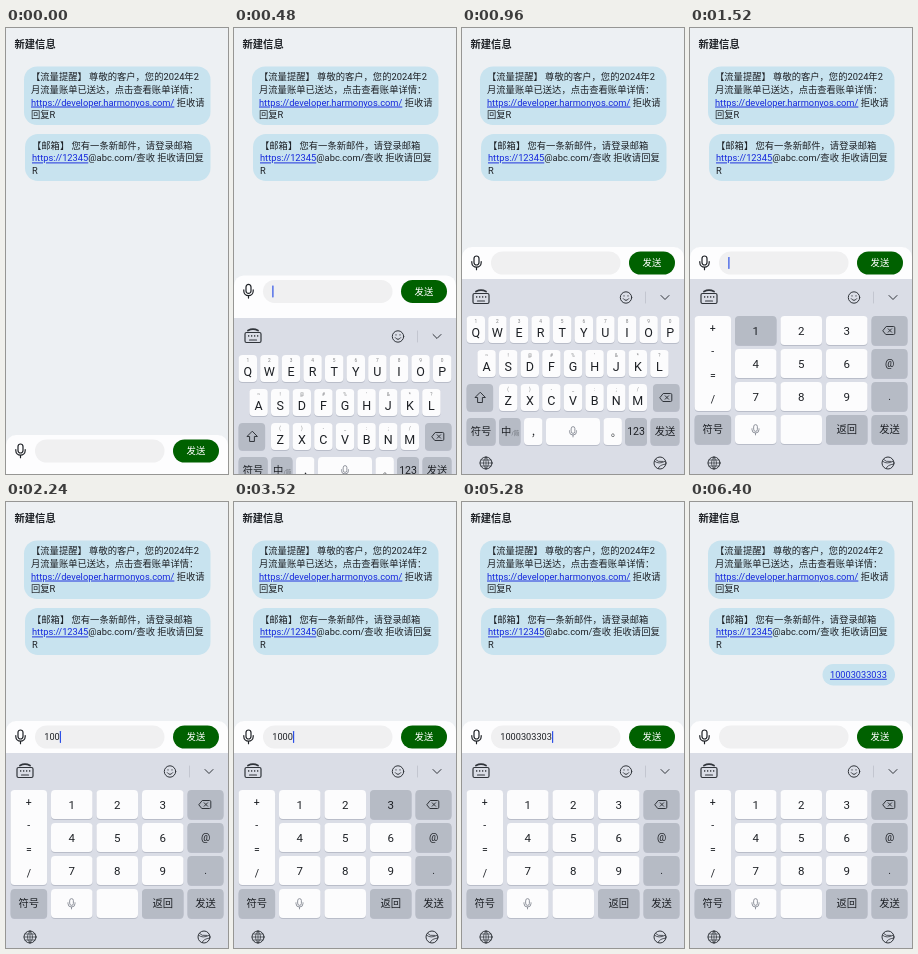
Recreate the animation shown at these times as an HTML page. Size 222 by 446 pixels, loop 6480 ms.

```html
<!DOCTYPE html>
<html lang="zh-CN">
<head>
<meta charset="utf-8">
<style>
  html, body { margin: 0; width: 100%; height: 100%; overflow: hidden; background: #edf0f3; }
  svg { display: block; width: 222px; height: 446px; }
  text { font-family: Roboto, "Noto Sans CJK SC", "Noto Sans CJK", sans-serif; white-space: pre; }
  .link { fill: #1528dc; text-decoration: underline; }
  .line { fill: none; stroke: #30343a; stroke-linecap: round; stroke-linejoin: round; }
</style>
</head>
<body>
<svg id="stage" viewBox="0 0 222 446"></svg>
<script>
const LOOP = 6480, STEP = 80;
const NUMBER = "10003033033";
const PRESSES = [1520, 1760, 2080, 3120, 3520, 3920, 4160, 4720, 4960, 5200, 5440];
const RELEASES = [1600, 1840, 2160, 3280, 3600, 4000, 4240, 4800, 5040, 5280, 5600];
const CURSOR_OFF = [[0, 240], [880, 1360], [2640, 3120], [4480, 4720], [6400, LOOP]];
const SLIDE_START = 160, SLIDE_TIME = 560;
const PAD_SHOWN = 1280, SENT = 6000;
const WHITE = "#fcfcfd", GREY = "#b6bbc5", INK = "#1d2025";

const rect = (x, y, w, h, r, fill, extra = "") =>
  `<rect x="${x}" y="${y}" width="${w}" height="${h}" rx="${r}" fill="${fill}" ${extra}/>`;

// y is the vertical middle of the glyphs
const text = (x, y, size, body, extra = "") =>
  `<text x="${x}" y="${y + size * 0.36}" font-size="${size}" fill="${INK}" ${extra}>${body}</text>`;
const label = (x, y, size, body, extra = "") => text(x, y, size, body, `text-anchor="middle" ${extra}`);
const line = (d, width = 1, extra = "") => `<path class="line" d="${d}" stroke-width="${width}" ${extra}/>`;
const at = (x, y, body) => `<g transform="translate(${x} ${y})">${body}</g>`;
const link = s => `<tspan class="link">${s}</tspan>`;

const key = (x, y, w, h, fill, body = "", size = 11, extra = "") =>
  rect(x, y + 1, w, h, 4, "#b9bdc9") + rect(x, y, w, h, 4, fill, extra) +
  (body ? label(x + w / 2, y + h / 2, size, body) : "");

const mic = (x, y, scale, color) => `<g transform="translate(${x} ${y}) scale(${scale})">` +
  line("M-2.5 -4a2.5 2.5 0 0 1 5 0v4a2.5 2.5 0 0 1 -5 0z M-4.7 -1v1a4.7 4.7 0 0 0 9.4 0v-1 M0 4.8v2.4",
    1.2, `style="stroke:${color}"`) + "</g>";

const backspace = (x, y) => at(x, y,
  line("M-6 0l3.2 -4h7.4q1.2 0 1.2 1.2v5.6q0 1.2 -1.2 1.2h-7.4z M-.8 -1.7l3.4 3.4m0 -3.4l-3.4 3.4"));

function bubble(x, y, w, h, textX, firstY, lines) {
  return rect(x, y, w, h, 13, "#c8e3ef") +
    lines.map((s, i) => text(textX, firstY + i * 12.6, 9.3, s)).join("");
}

function messages() {
  return text(8.5, 16.5, 10.3, "新建信息", 'font-weight="700"') +
    bubble(18, 38.5, 186.5, 58.5, 25, 49, [
      "【流量提醒】 尊敬的客户，您的2024年2",
      "月流量账单已送达，点击查看账单详情：",
      link("https://developer.harmonyos.com/") + " 拒收请",
      "回复R"]) +
    bubble(19, 106, 185.5, 47, 26, 117.5, [
      "【邮箱】 您有一条新邮件，请登录邮箱",
      link("https://12345") + "@abc.com/查收 拒收请回复",
      "R"]) +
    `<g id="reply">${rect(132.5, 162, 72.5, 21.5, 10.7, "#c8e3ef")}${text(140, 172.5, 9.2, link(NUMBER))}</g>`;
}

// drawn around y = 0
function inputBar() {
  return rect(0, -16, 222, 240, 10, "#fdfdfe") + mic(14.5, -0.5, 1, INK) +
    rect(29, -11.5, 129.5, 23, 11.5, "#f0f0f1") +
    rect(167, -11.5, 46, 23, 11.5, "#006100") +
    label(190, 0, 9.4, "发送", 'style="fill:#fff" font-weight="500"') +
    text(38.3, 0, 9.2, "", 'id="typed"') +
    rect(38, -6, 1.2, 12, 0.4, "#2d50e6", 'id="cursor"');
}

function toolbar() {
  const dots = [14, 17, 20, 23].map(x => rect(x, 268.3, 1.3, 1.3, 0, INK)).join("");
  return rect(0, 251, 222, 200, 0, "#dadde6") +
    line("M12.5 265.5h13q1.5 0 1.5 1.5v7q0 1.5 -1.5 1.5h-13q-1.5 0 -1.5 -1.5v-7q0 -1.5 1.5 -1.5z M15.5 273h7", 1.2) +
    line("M14 263.5q5 -2.6 10 0", 1.8) + dots +
    at(164, 269.5, '<circle class="line" r="5.7"/>' + line("M-2.7 1.2q2.7 3.6 5.4 0 M-2 -1.8v.4 M2 -1.8v.4")) +
    line("M183.5 264v11", 0.6, 'style="stroke:#b4b8c2"') + line("M199 267.5l4 4 4 -4") +
    at(24, 435, '<circle class="line" r="6"/>' +
      line("M-6 0h12 M0 -6v12 M0 -6q-5.5 6 0 12 M0 -6q5.5 6 0 12 M-5 -3h10 M-5 3h10", 0.7)) +
    at(198, 435, '<circle class="line" r="6"/>' +
      line("M-5.6 -2q4 4 11 .2 M-4.5 -3.5q2 2.8 7.5 2 M-2 5.6q1.5 -4 7.8 -4.5", 0.8));
}

function letterKeys() {
  const pitch = 21.6, width = 18.4;
  const row = (letters, hints, x0, y) => [...letters].map((c, i) => {
    const x = x0 + i * pitch, mid = x + width / 2;
    return key(x, y, width, 27, WHITE) +
      label(mid, y + 5.5, 4.8, hints[i].replace("&", "&amp;"), 'opacity=".55"') + label(mid, y + 16.5, 12.5, c);
  }).join("");
  return row("QWERTYUIOP", "1234567890", 4.6, 288) +
    row("ASDFGHJKL", "~!@#%'&*?", 15.4, 322) +
    row("ZXCVBNM", "()-_:;/", 37, 356) +
    key(4.6, 356, 26.5, 27, GREY) + line("M18 364.5l-5 5h2.6v5h4.8v-5h2.6z") +
    key(191, 356, 26.5, 27, GREY) + backspace(204, 369.5) +
    key(4.6, 390, 29, 27, GREY, "符号", 10.3) +
    key(37, 390, 21.5, 27, GREY) + text(39, 403.5, 10.3, "中") +
    text(49.5, 405, 5.5, "/简", 'opacity=".5"') +
    key(62, 390, 18.4, 27, WHITE) + label(74, 404, 10, "，") +
    key(84, 390, 54, 27, WHITE) + mic(111, 403.5, 0.75, "#858a94") +
    key(141.5, 390, 18.4, 27, WHITE) + label(154, 404, 10, "。") +
    key(163, 390, 22, 27, GREY, "123", 10.5) +
    key(188.5, 390, 29, 27, GREY, "发送", 10.3);
}

function numberKeys() {
  const columns = [45, 90.5, 136], rows = [288, 321, 354, 387], w = 41.5, h = 29;
  const digit = (n, x, y) => key(x, y, w, h, WHITE, n, 11.5, `id="digit${n}"`);
  let out = key(4.6, 288, 36.5, 95, WHITE);
  ["+", "-", "=", "/"].forEach((s, i) => out += label(22.8, 300 + i * 23.7, 10.5, s));
  for (let n = 1; n <= 9; n++) out += digit(n, columns[(n - 1) % 3], rows[Math.floor((n - 1) / 3)]);
  ["", "@", ".", "发送"].forEach((s, i) => out += key(181.5, rows[i], 36, h, GREY, s, 10.3));
  return out + backspace(199, 302.5) +
    key(4.6, 387, 36.5, h, GREY, "符号", 10.3) +
    key(45, 387, w, h, WHITE) + mic(65.5, 401.5, 0.75, "#858a94") +
    digit(0, 90.5, 387) + key(136, 387, w, h, GREY, "返回", 10.3);
}

const stage = document.getElementById("stage");
stage.innerHTML = rect(0, 0, 222, 446, 0, "#edf0f3") + messages() +
  `<g id="bar">${inputBar()}</g>` +
  `<g id="keyboard">${toolbar()}<g id="letters">${letterKeys()}</g><g id="pad">${numberKeys()}</g></g>`;

const el = id => document.getElementById(id);
const show = (id, on) => el(id).setAttribute("visibility", on ? "visible" : "hidden");
const moveY = (id, y) => el(id).setAttribute("transform", `translate(0 ${y})`);

function draw(t) {
  const left = 1 - Math.min(1, Math.max(0, (t - SLIDE_START) / SLIDE_TIME));
  moveY("bar", 235 + 188 * left ** 2.23);
  moveY("keyboard", 195 * left ** 1.9);
  show("letters", t < PAD_SHOWN);
  show("pad", t >= PAD_SHOWN);

  const sent = t >= SENT;
  const count = sent ? 0 : RELEASES.filter(r => r <= t).length;
  el("typed").textContent = NUMBER.slice(0, count);
  el("cursor").setAttribute("x", 38.3 + 5.17 * count);
  show("cursor", !CURSOR_OFF.some(([from, to]) => t >= from && t < to));
  show("reply", sent);

  const active = PRESSES.findIndex((p, i) => t >= p && t < RELEASES[i]);
  for (let n = 0; n <= 9; n++)
    el("digit" + n).setAttribute("fill", active >= 0 && NUMBER[active] === String(n) ? GREY : WHITE);
}

const start = performance.now();
function tick() {
  const t = (performance.now() - start) % LOOP;
  draw(Math.floor(t / STEP) * STEP);
  requestAnimationFrame(tick);
}
tick();
</script>
</body>
</html>
```
